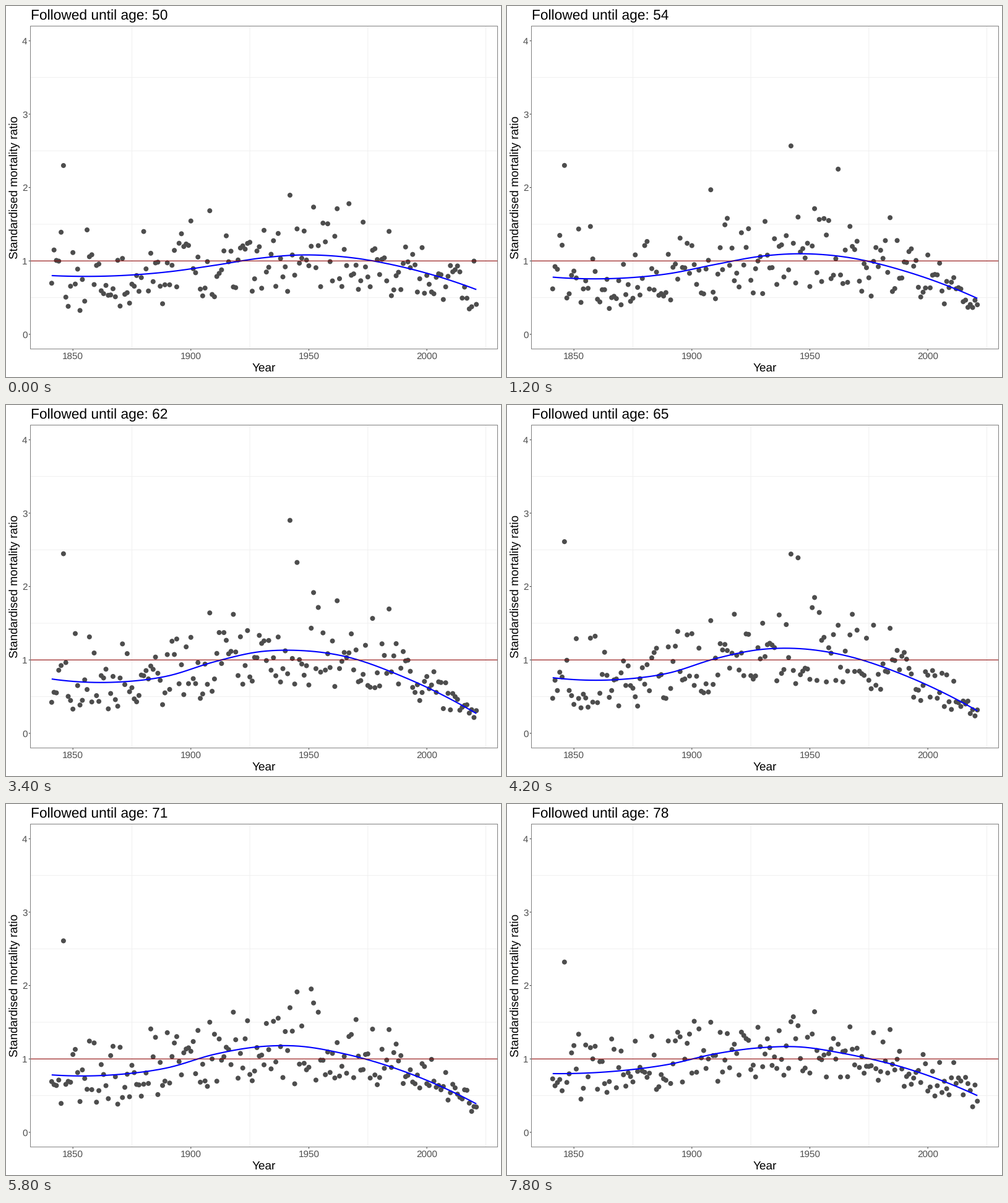
These frames come from a looping animation (800x600 px, 8 s). A matplotlib script:

```python
import numpy as np
import matplotlib.pyplot as plt
from matplotlib.animation import FuncAnimation
from matplotlib.patches import Rectangle

W, H, DPI = 800, 600, 100
PX = 72 / DPI
LEFT, RIGHT, TOP, BOTTOM = 39.5, 794.5, 32.5, 554.7
STEPS = 40
AGES = 29
AGE_RATE = 70 / 99          # years of age per step
INK = "#333333"
GREY = "#4d4d4d"

plt.rcParams.update({"font.family": "Liberation Sans", "path.snap": False,
                     "text.hinting": "none"})


def px_x(year):
    return LEFT + (year - 1832) / 198 * (RIGHT - LEFT)


def px_y(ratio):
    return BOTTOM - (ratio + 0.2) / 4.4 * (BOTTOM - TOP)


# Smoothed ratio at a few knot years, for four steps of the loop.
KNOTS = np.array([1841, 1870, 1890, 1910, 1930, 1945, 1965, 1990, 2021])
KEYS = np.array([0, 17, 25, 39])
TREND = np.array([
    [.80, .80, .85, .94, 1.04, 1.08, 1.055, .915, .61],
    [.74, .70, .78, .975, 1.115, 1.13, 1.05, .77, .27],
    [.775, .77, .86, 1.06, 1.175, 1.18, 1.07, .815, .343],
    [.80, .84, .925, 1.07, 1.155, 1.165, 1.07, .88, .50],
])

# Outlying years: resting ratio, peak ratio, step of the peak, width in steps.
PEAKS = {
    1846: (2.3, 2.7, 25, 8),
    1908: (1.5, 2.0, 8, 8),
    1942: (1.5, 3.1, 13, 11),
    1945: (1.4, 2.4, 20, 11),
    1951: (1.2, 2.0, 27, 9),
    1962: (1.2, 2.35, 9, 10),
    1984: (1.4, 2.2, 12, 5),
}


def smooth(x, xs, ys):
    """Cubic Hermite curve through the knots."""
    slope = np.gradient(ys, xs, edge_order=2)
    i = np.clip(np.searchsorted(xs, x, side="right") - 1, 0, len(xs) - 2)
    h = xs[i + 1] - xs[i]
    t = (x - xs[i]) / h
    return ((1 + 2 * t) * (1 - t) ** 2 * ys[i] + t * (1 - t) ** 2 * h * slope[i]
            + t * t * (3 - 2 * t) * ys[i + 1] + t * t * (t - 1) * h * slope[i + 1])


def blend(t, ts, rows):
    """Linear mix of the rows at time t."""
    i = min(np.searchsorted(ts, t, side="right") - 1, len(ts) - 2)
    f = (t - ts[i]) / (ts[i + 1] - ts[i])
    return rows[i] * (1 - f) + rows[i + 1] * f


def trend_at(step, x):
    return smooth(x, KNOTS, blend(min(step, KEYS[-1]), KEYS, TREND))


years = np.arange(1841, 2022)
curve_x = np.linspace(1841, 2021, 80)
age_steps = np.round(np.arange(AGES) / AGE_RATE)


def scatter_by_age(rng, memory=0.93):
    """Ratios around the trend for each age; the scatter drifts with age."""
    spread = 0.34 + 0.18 * np.exp(-((years - 1841) / 50) ** 2)
    z = rng.normal(size=years.size)
    rows = []
    for step in age_steps:
        s = spread * (1 - 0.25 * (step / STEPS) ** 2)
        row = trend_at(step, years) * np.exp(s * 2 * np.tanh(z / 2) - s * s / 2)
        row[row < 0.2] = 0
        for year, (rest, peak, centre, width) in PEAKS.items():
            bump = np.exp(-((step - centre) / width) ** 2)
            row[year - years[0]] = rest + (peak - rest) * bump
        rows.append(row)
        z = memory * z + np.sqrt(1 - memory ** 2) * rng.normal(size=years.size)
    return np.array(rows)


ratios = scatter_by_age(np.random.default_rng(12))

fig = plt.figure(figsize=(W / DPI, H / DPI), dpi=DPI, facecolor="white")
ax = fig.add_axes([0, 0, 1, 1])
ax.set_xlim(0, W)
ax.set_ylim(H, 0)
ax.axis("off")


def line(x, y, color, width=1.0, z=1):
    ax.plot(x, y, color=color, lw=width * PX, zorder=z, solid_capstyle="butt")


def label(x, y, text, size, color="black", **kw):
    return ax.text(x, y, text, fontsize=size * PX, color=color,
                   va="baseline", **kw)


for year in range(1875, 2026, 50):
    line([px_x(year)] * 2, [TOP, BOTTOM], "#f0f0f0")
for half in range(4):
    line([LEFT, RIGHT], [px_y(half + 0.5)] * 2, "#f0f0f0")

for year in range(1850, 2001, 50):
    line([px_x(year)] * 2, [BOTTOM, BOTTOM + 2.75], INK)
    label(px_x(year), 571, str(year), 15.2, GREY, ha="center")
for ratio in range(5):
    line([LEFT - 2.75, LEFT], [px_y(ratio)] * 2, INK)
    label(34.5, px_y(ratio) + 5.5, str(ratio), 15.2, GREY, ha="right")

dots = ax.scatter(px_x(years), px_y(ratios[0]), s=np.full(years.size, (8 * PX) ** 2),
                  color=GREY, linewidths=0, zorder=3)
trend, = ax.plot([], [], color="#0000ff", lw=2.13 * PX, zorder=4,
                 solid_capstyle="butt")
line([LEFT, RIGHT], [px_y(1)] * 2, "#8b0000", 1.07, z=5)
ax.add_patch(Rectangle((LEFT, TOP), RIGHT - LEFT, BOTTOM - TOP, fill=False,
                       ec="#7f7f7f", lw=PX, zorder=6))

title = label(39.5, 22, "", 22.8)
label(417, 591, "Year", 19, ha="center")
label(19, (TOP + BOTTOM) / 2, "Standardised mortality ratio", 19,
      ha="center", rotation=90, rotation_mode="anchor")


def draw(step):
    title.set_text(f"Followed until age: {50 + round(step * AGE_RATE)}")
    now = blend(step, age_steps, ratios)
    dots.set_offsets(np.column_stack([px_x(years), px_y(now)]))
    trend.set_data(px_x(curve_x), px_y(trend_at(step, curve_x)))
    return title, dots, trend


anim = FuncAnimation(fig, draw, frames=STEPS, init_func=lambda: draw(0),
                     interval=200, repeat=True, repeat_delay=0, blit=False)
plt.show()
```
